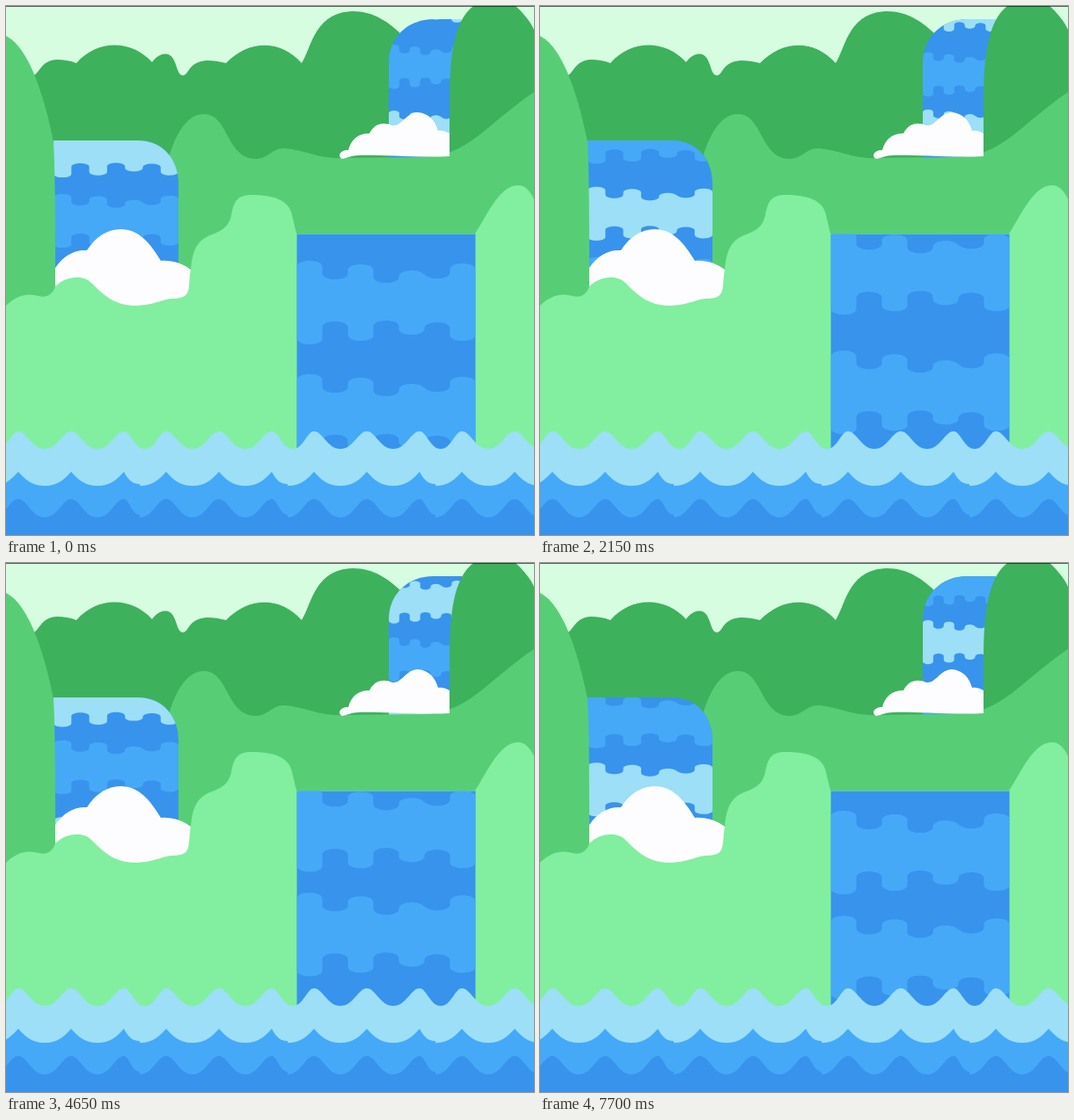
An HTML page with a canvas that plays this animation: 600x602 px, repeating every 7750 ms.

```html
<!DOCTYPE html>
<html lang="en">
<head>
<meta charset="utf-8">
<title>Waterfalls</title>
<style>
html, body { margin: 0; width: 100%; height: 100%; overflow: hidden; background: #d7fde1; }
canvas { display: block; width: 600px; height: 602px; }
</style>
</head>
<body>
<canvas id="stage" width="600" height="602"></canvas>
<script>
const ctx = document.getElementById('stage').getContext('2d');
const LOOP = 7750, STEP = 50;
const SKY = '#d7fde1', FOREST = '#3eb15d', HILL = '#57ce76', MEADOW = '#81ef9f', FOAM = '#fdfdff';
const PALE = '#9cdff6', BLUE = '#45a9f8', DEEP = '#3893ed';

const land = {
  forest: new Path2D('M0 200V79H30C38 79 38 62 58 61C66 61 72 62 80 65C104 38 142 38 166 64' +
    'C172 55 184 50 190 60C195 69 195 79 201 79C208 79 206 64 228 62C236 62 242 63 250 65' +
    'C276 38 312 38 336 65C347 49 350 7 394 6C418 6 435 18 452 35V200H600V300H0Z'),
  peak: new Path2D('M504 180L504 110C504 60 508 18 531 0H579C588 8 596 18 600 27V180Z'),
  hill: new Path2D('M183 180C190 152 203 123 225 123C253 123 250 173 283 174C298 174 303 161 317 162' +
    'C340 164 358 175 385 173L470 172C524 173 545 135 600 98V602H183Z'),
  slope: new Path2D('M0 34C28 48 45 110 54 155C56 195 56 240 56 330V360H0Z'),
  meadow: new Path2D('M0 341C14 328 25 327 37 330C48 333 54 326 56 319C69 307 88 305 98 316' +
    'C113 331 125 341 148 341C171 340 178 333 190 333C213 333 206 319 210 300' +
    'C212 276 218 265 237 259C249 254 254 248 256 238C259 221 264 215 279 215' +
    'C304 215 322 221 325 238L330 259H533C546 240 560 204 582 204C590 204 596 211 600 220V602H0Z'),
  farCloud: new Path2D('M382 174C377 172 378 164 389 164C392 152 400 145 413 145C418 134 429 131 439 136' +
    'C450 137 455 121 468 121C481 122 488 131 491 142C496 141 500 143 504 145V171' +
    'C470 173 424 169 400 170C393 170 388 173 382 174Z'),
  nearCloud: new Path2D('M56 298C65 284 78 277 92 278C102 262 116 254 130 254C151 254 164 270 176 290' +
    'C188 289 201 293 210 300V345H56Z')
};

// size: lobe scale, body: straight height, tops: band positions at time zero
const far = {
  clip: new Path2D('M435 175V64C435 36 456 15 486 15H518V175Z'),
  x: 435, col: 11.9, size: 0.47, body: 38, speed: 68.5,
  tops: [119, 44, -29.5, -94.5, -166.5, -234, -300, -384, -462.5, -528.5], colors: [PALE, BLUE]
};
const side = {
  clip: new Path2D('M50 153H150C178 153 196 174 196 203V340H50Z'),
  x: 54, col: 20.3, size: 0.62, body: 45, speed: 33.4,
  tops: [214, 134, 46.5, -30, -107.5], colors: [BLUE, PALE]
};
const front = {
  clip: new Path2D('M330.5 259.5H533.5V520H330.5Z'),
  x: 330.5, col: 29, size: 1, body: 69, speed: 47.6,
  tops: [419, 290, 154, 35, -84.5], colors: [BLUE, BLUE]
};

const UPPER = [0, 21, 4, 25, 11, 20, 3];
const LOWER = [26, 0, 22, -1, 15, 1, 22];

function fill(path, color) {
  ctx.fillStyle = color;
  ctx.fill(path);
}

// one rounded lobe ending at tip, bulging in direction dir
function lobe(x0, x1, tip, r, dir) {
  const edge = tip - dir * r, ctrl = edge + dir * r * 4 / 3;
  const inset = (x1 - x0) * 0.06;
  ctx.lineTo(x0, edge);
  ctx.bezierCurveTo(x0 + inset, ctrl, x1 - inset, ctrl, x1, edge);
}

function band(f, y, color) {
  const r = 6 * f.size;
  ctx.beginPath();
  for (let i = 0; i < 7; i++) {
    const x = f.x + i * f.col;
    lobe(x, x + f.col, y + UPPER[i] * f.size, r, i % 2 ? 1 : -1);
  }
  for (let i = 6; i >= 0; i--) {
    const x = f.x + i * f.col;
    lobe(x + f.col, x, y + f.body + LOWER[i] * f.size, r, i % 2 ? -1 : 1);
  }
  ctx.closePath();
  ctx.fillStyle = color;
  ctx.fill();
}

function waterfall(f, sec) {
  ctx.save();
  ctx.clip(f.clip);
  ctx.fillStyle = DEEP;
  ctx.fillRect(0, 0, 600, 602);
  f.tops.forEach((top, i) => band(f, top + f.speed * sec, f.colors[i % 2]));
  ctx.restore();
}

// rolling surface, three crests per 168 px tile with a seam after the third
function waves(crest, trough, sharp, seam, color) {
  const half = (x0, y0, x1, y1, rising) => {
    const w = x1 - x0;
    const a = rising ? 0.5 : sharp ? 0.27 : 0.33;
    const b = rising ? (sharp ? 0.73 : 0.67) : 0.5;
    const tipY = sharp ? crest + (trough - crest) * 0.55 : crest;
    ctx.bezierCurveTo(x0 + w * a, rising ? y0 : tipY, x0 + w * b, rising ? tipY : y1, x1, y1);
  };
  ctx.beginPath();
  ctx.moveTo(-184, trough);
  for (let tile = -1; tile < 4; tile++) {
    for (let i = 0; i < 3; i++) {
      const c = 14 + tile * 168 + i * 60;
      const end = i === 2 ? c + (seam ? 18 : 24) : c + 30;
      const start = i === 0 ? c - (seam ? 30 : 24) : c - 30;
      ctx.lineTo(start, trough);
      half(start, trough, c, crest, true);
      half(c, crest, end, trough - (i === 2 ? seam : 0), false);
    }
  }
  ctx.lineTo(700, 610);
  ctx.lineTo(-184, 610);
  ctx.fillStyle = color;
  ctx.fill();
}

function draw(ms) {
  const sec = Math.floor(ms / STEP) * STEP / 1000;
  ctx.fillStyle = SKY;
  ctx.fillRect(0, 0, 600, 602);
  fill(land.forest, FOREST);
  waterfall(far, sec);
  fill(land.peak, FOREST);
  fill(land.hill, HILL);
  fill(land.farCloud, FOAM);
  waterfall(side, sec);
  fill(land.slope, HILL);
  fill(land.nearCloud, FOAM);
  fill(land.meadow, MEADOW);
  waterfall(front, sec);
  waves(484, 504, false, 0, PALE);
  waves(530, 546, true, 2, BLUE);
  waves(561, 582, false, 3, DEEP);
  ctx.fillStyle = 'rgba(0, 0, 0, 0.6)';
  ctx.fillRect(0, 0, 600, 1);
}

const begin = performance.now();
function tick(now) {
  draw(Math.max(0, now - begin) % LOOP);
  requestAnimationFrame(tick);
}
draw(0);
requestAnimationFrame(tick);
</script>
</body>
</html>
```
